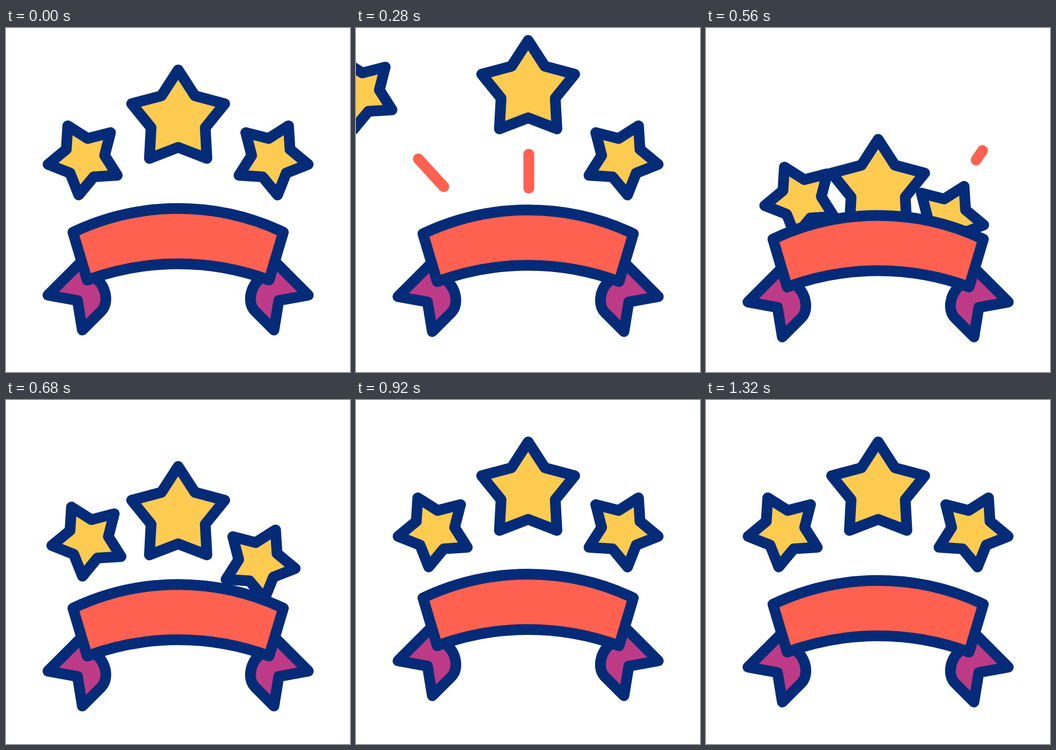
These frames come from a looping animation (640x640 px, 1.48 s). An HTML page:

```html
<!DOCTYPE html>
<html lang="en">
<head>
<meta charset="utf-8">
<title>Ribbon and stars</title>
<style>
  html, body { margin: 0; width: 100%; height: 100%; overflow: hidden; background: #fff; }
  svg { display: block; width: 100vw; height: 100vh; }
  .ink { stroke: #042b77; stroke-width: 20; stroke-linejoin: round; stroke-linecap: round; }
  .star { fill: #fdcb50; }
  .tail { fill: #bd3a86; }
  .band { fill: #ff6150; }
  .ray { stroke: #ff6150; stroke-width: 20; stroke-linecap: round; }
</style>
</head>
<body>
<svg viewBox="0 0 640 640">
  <defs>
    <path id="tail" class="ink tail" d="M140 435L78 497L133 507L142 562L177 527C190 514 189 487 170 468Z"/>
    <!-- Everything above the middle of the ribbon -->
    <clipPath id="above">
      <path d="M0 0H640V430H503A480 480 0 0 0 137 430H0Z"/>
    </clipPath>
  </defs>
  <g id="rays"></g>
  <g id="stars" clip-path="url(#above)"></g>
  <g id="ribbon">
    <use href="#tail"/>
    <use href="#tail" transform="translate(640.500 0) scale(-1 1)"/>
    <path class="ink band" d="M124.500 380A456 456 0 0 1 516 380L489.500 469A489 489 0 0 0 151 469Z"/>
  </g>
</svg>
<script>
const STEP = 40, STEPS = 37;

// Times below are in steps: [start, length].
const STARS = [
  { x: 146, y: 243, tip: 68.5, dent: 38, turn: 27,
    out: [3, 7], away: [-231, -201], back: [9, 10.1], from: [84, 208] },
  { x: 494.5, y: 243, tip: 68.5, dent: 38, turn: -27,
    out: [7, 7], away: [231, -201], back: [9, 14.1], from: [-84, 208] },
  { x: 320.3, y: 169, tip: 91, dent: 53, turn: 0,
    out: [5, 7], away: [0, -277], back: [9, 11.4], from: [0, 296] }
];
const RAYS = [
  { a: [194, 329], b: [116, 243.5], head: [2, 5], rear: [4, 7] },
  { a: [321.5, 304], b: [321.5, 197], head: [4, 5], rear: [6, 7] },
  { a: [454.5, 317], b: [514.5, 228], head: [7, 5], rear: [9, 7] }
];
const RIBBON = [[0, 0], [4, 0], [14, 12.8], [24, -12.5], [33, 0], [37, 0]];

const $ = id => document.getElementById(id);
const lerp = (a, b, p) => a + (b - a) * p;
const part = (k, [start, length]) => Math.min(1, Math.max(0, (k - start) / length));
const smooth = p => p * p * (3 - 2 * p);

// Cubic bezier (1/6, 1/6, 2/3, 1): brisk start, soft landing.
function land(p) {
  if (p <= 0 || p >= 1) return p;
  const curve = (t, c1, c2) => 3 * c1 * t * (1 - t) ** 2 + 3 * c2 * t * t * (1 - t) + t ** 3;
  let lo = 0, hi = 1;
  for (let i = 0; i < 24; i++) {
    const mid = (lo + hi) / 2;
    if (curve(mid, 1 / 6, 2 / 3) < p) lo = mid; else hi = mid;
  }
  return curve(lo, 1 / 6, 1);
}

function add(parent, tag, attrs) {
  const el = document.createElementNS('http://www.w3.org/2000/svg', tag);
  for (const name in attrs) el.setAttribute(name, attrs[name]);
  return parent.appendChild(el);
}

const show = (el, on) => el.setAttribute('visibility', on ? 'visible' : 'hidden');

function place(el, [x, y], amount) {
  el.setAttribute('transform', `translate(${x * amount} ${y * amount})`);
}

function starPoints({ x, y, tip, dent, turn }) {
  return Array.from({ length: 10 }, (_, i) => {
    const angle = (i * 36 - 90 - turn) * Math.PI / 180;
    const r = i % 2 ? dent : tip;
    return `${x + r * Math.cos(angle)},${y + r * Math.sin(angle)}`;
  }).join(' ');
}

for (const s of STARS) {
  const make = () => add($('stars'), 'polygon', { class: 'ink star', points: starPoints(s) });
  s.leaving = make();
  s.arriving = make();
}
for (const r of RAYS) r.el = add($('rays'), 'line', { class: 'ray' });

function ribbonY(k) {
  const i = RIBBON.findIndex(([time]) => k < time);
  const [t0, y0] = RIBBON[i - 1], [t1, y1] = RIBBON[i];
  return lerp(y0, y1, smooth((k - t0) / (t1 - t0)));
}

function draw(k) {
  for (const s of STARS) {
    const gone = part(k, s.out);
    place(s.leaving, s.away, smooth(gone));
    show(s.leaving, gone < 1);
    place(s.arriving, s.from, 1 - land(part(k, s.back)));
    show(s.arriving, k >= s.back[0]);
  }
  for (const { el, a, b, head, rear } of RAYS) {
    const h = smooth(part(k, head)), r = smooth(part(k, rear));
    const ends = { x1: lerp(a[0], b[0], r), y1: lerp(a[1], b[1], r),
                   x2: lerp(a[0], b[0], h), y2: lerp(a[1], b[1], h) };
    for (const name in ends) el.setAttribute(name, ends[name]);
    show(el, h > r);
  }
  place($('ribbon'), [0, 1], ribbonY(k));
}

const begin = performance.now();
function tick() {
  draw(Math.floor((performance.now() - begin) / STEP) % STEPS);
  requestAnimationFrame(tick);
}
tick();
</script>
</body>
</html>
```
